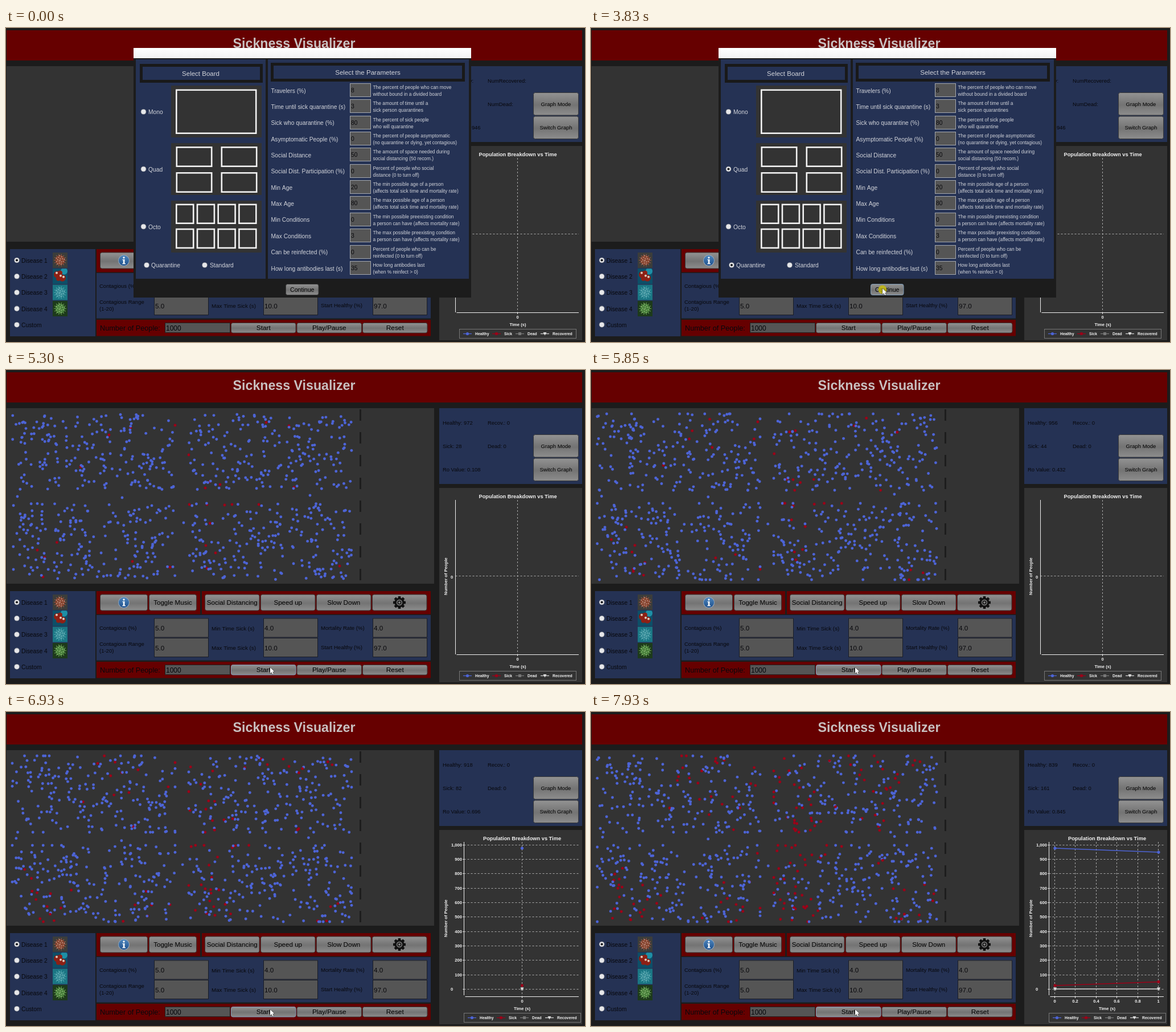
Recreate the animation shown at these times as an HTML page with a canvas. Size 1017 px wide and 551 px high, loop 8 s.

```html
<!DOCTYPE html>
<html lang="en">
<head>
<meta charset="utf-8">
<title>Sickness Visualizer</title>
<style>
html, body { margin: 0; width: 100%; height: 100%; overflow: hidden; background: #1c1c1c; }
canvas { display: block; }
</style>
</head>
<body>
<canvas id="stage" width="1017" height="551"></canvas>
<script>
const ctx = document.getElementById('stage').getContext('2d');
const LOOP = 8000, STEP = 77.2;
const DARK = '#1c1c1c', NAVY = '#253254', RED = '#660000', GREY = '#333333';
const INK = '#08080c', PALE = '#d2d4da', BLUE = '#4d64d6', SICK = '#9c0018';

// Drawing helpers
function box(x0, y0, x1, y1, color) {
  ctx.fillStyle = color;
  ctx.fillRect(x0, y0, x1 - x0, y1 - y0);
}
function frame(x0, y0, x1, y1, color, width = 1) {
  ctx.strokeStyle = color;
  ctx.lineWidth = width;
  ctx.strokeRect(x0 + width / 2, y0 + width / 2, x1 - x0 - width, y1 - y0 - width);
}
function disc(x, y, r, color) {
  ctx.fillStyle = color;
  ctx.beginPath();
  ctx.arc(x, y, r, 0, 7);
  ctx.fill();
}
function line(x0, y0, x1, y1, color, width = 1, dash = []) {
  ctx.strokeStyle = color;
  ctx.lineWidth = width;
  ctx.setLineDash(dash);
  ctx.beginPath();
  ctx.moveTo(x0, y0);
  ctx.lineTo(x1, y1);
  ctx.stroke();
  ctx.setLineDash([]);
}
function text(s, x, yMid, size, color = INK, align = 'left', weight = '') {
  ctx.font = `${weight} ${size}px "Liberation Sans", Arial, sans-serif`;
  ctx.textAlign = align;
  ctx.fillStyle = color;
  ctx.fillText(s, x, yMid + size * 0.36);
}
function button(x0, y0, x1, y1, label, size, focus) {
  const g = ctx.createLinearGradient(0, y0, 0, y1);
  g.addColorStop(0, '#949494');
  g.addColorStop(0.45, '#787878');
  g.addColorStop(0.55, '#747474');
  g.addColorStop(1, '#8e8e8e');
  ctx.beginPath();
  ctx.roundRect(x0 + 0.5, y0 + 0.5, x1 - x0 - 1, y1 - y0 - 1, 3);
  ctx.fillStyle = g;
  ctx.fill();
  ctx.strokeStyle = focus ? '#7c9ab8' : '#3a3a3a';
  ctx.lineWidth = 1;
  ctx.stroke();
  text(label, (x0 + x1) / 2, (y0 + y1) / 2, size, '#000', 'center');
}
function field(x0, y0, x1, y1, value, size, edge) {
  box(x0, y0, x1, y1, '#555555');
  frame(x0, y0, x1, y1, edge);
  text(value, x0 + 2, (y0 + y1) / 2 + 0.5, size);
}
function radio(x, y, label, tx, color, on, focus) {
  if (focus) disc(x, y, 5.8, '#7da3c8');
  disc(x, y, 4.8, '#8b8e94');
  disc(x, y, 4, '#e6e7ea');
  if (on) disc(x, y, 2.1, '#15171c');
  text(label, tx, y + 0.5, 10.3, color);
}

// Seeded population
function rng(seed) {
  return () => {
    seed = (seed + 0x6D2B79F5) | 0;
    let t = Math.imul(seed ^ (seed >>> 15), 1 | seed);
    t = (t + Math.imul(t ^ (t >>> 7), 61 | t)) ^ t;
    return ((t ^ (t >>> 14)) >>> 0) / 4294967296;
  };
}
const rand = rng(20);
const VISIBLE = 860;
const SEEDS = [[219, 101], [181, 114], [131, 170], [297, 97], [457, 92], [497, 98], [321, 149],
  [350, 207], [376, 201], [358, 196], [506, 206], [322, 236], [353, 236], [384, 237], [397, 236],
  [444, 236], [55, 316], [68, 329], [65, 363], [222, 336], [288, 346], [351, 308], [368, 321],
  [353, 348], [586, 344], [575, 363]];
const LONERS = [[20, 222], [204, 224], [312, 268], [534, 220]];

function person(x, y, loner) {
  return {
    x, y, loner,
    left: x < 309 ? 11 : 321, top: y < 222 ? 77 : 234,
    amp: 4 + rand() * 9, wx: 1.5 + rand() * 2.5, wy: 1.5 + rand() * 2.5,
    px: rand() * 6.3, py: rand() * 6.3
  };
}
const people = [...SEEDS.map(p => person(...p, false)), ...LONERS.map(p => person(...p, true))];
while (people.length < VISIBLE) {
  const q = people.length % 4;
  people.push(person((q % 2 ? 321 : 11) + rand() * 286, (q > 1 ? 234 : 77) + rand() * 134, false));
}
// Infection spreads to someone in reach of a random carrier
const order = people.slice(0, SEEDS.length);
const healthy = new Set(people.slice(SEEDS.length).filter(p => !p.loner));
while (order.length < 170) {
  const from = order[Math.floor(rand() * order.length)];
  const near = [...healthy].filter(p => Math.hypot(p.x - from.x, p.y - from.y) < 45);
  const next = near[Math.floor(rand() * near.length)];
  if (!next) continue;
  healthy.delete(next);
  order.push(next);
}
order.forEach((p, i) => { p.rank = i; });

const clamp = (v, a, b) => Math.min(b, Math.max(a, v));
function drawPerson(p, s, sick) {
  const amp = p.loner ? 1.5 : p.amp;
  let x = p.x + amp * (Math.sin(p.wx * s + p.px) - Math.sin(p.px));
  let y = p.y + amp * (Math.sin(p.wy * s + p.py) - Math.sin(p.py));
  if (!p.loner) {
    x = clamp(x, p.left, p.left + 286);
    y = clamp(y, p.top, p.top + 134);
  }
  disc(x, y, 2.45, p.rank < sick ? SICK : BLUE);
}

function track(keys, k, col) {
  let i = 0;
  while (i < keys.length - 2 && k > keys[i + 1][0]) i++;
  const a = keys[i], b = keys[i + 1];
  return a[col] + (b[col] - a[col]) * clamp((k - a[0]) / (b[0] - a[0]), 0, 1);
}
// step, sick, reproduction value
const STATS = [[64, 25, 0], [69, 28, 0.108], [76, 44, 0.432], [90, 82, 0.696], [103, 161, 0.845]];

// Chart
function marker(x, y, kind) {
  if (kind === 0) disc(x, y, 2.6, BLUE);
  else if (kind === 1) box(x - 2.3, y - 2.3, x + 2.3, y + 2.3, SICK);
  else if (kind === 2) box(x - 2.5, y - 2.5, x + 2.5, y + 2.5, '#777');
  else {
    ctx.fillStyle = '#ddd';
    ctx.beginPath();
    ctx.moveTo(x - 3, y - 2.5);
    ctx.lineTo(x + 3, y - 2.5);
    ctx.lineTo(x, y + 3);
    ctx.fill();
  }
}
// name, color, legend offset, first and second value heights
const SERIES = [['Healthy', BLUE, 0, 239, 246], ['Sick', SICK, 51, 480, 473.5],
  ['Dead', '#777', 92, 486, 486], ['Recovered', '#ccc', 136, 486, 486]];

function chart(points) {
  const shift = points ? 7.5 : 0, mid = 899 + shift, axis = points ? 804.5 : 789.5;
  const grid = '#a8a8a8', white = '#f0f0f0', dash = [3, 3];
  const label = (s, x, y, size = 7.6, align = 'center') => text(s, x, y, size, white, align, 'bold');
  box(761, 207, 1012, 548, GREY);
  label('Population Breakdown vs Time', mid, 222, 9.25);
  ctx.save();
  ctx.translate(772, 362);
  ctx.rotate(-Math.PI / 2);
  label('Number of People', 0, 0, 7.7);
  ctx.restore();
  if (points) {
    for (let i = 0; i <= 10; i++) {
      const y = Math.round(486 - i * 25.35) + 0.5;
      line(axis, y, 1006, y, grid, 1, dash);
      line(axis - 2, y, axis, y, white);
      if (i) label((i * 100).toLocaleString('en-US'), 801, y, 7.6, 'right');
      else label('0', 783, y);
    }
  } else {
    line(axis, 361.5, 1006, 361.5, grid, 1, dash);
    label('0', 783, 363);
  }
  const ticks = points === 2 ? 6 : 1;
  for (let i = 0; i < ticks; i++) {
    const x = ticks > 1 ? Math.round(815 + i * 36.45) - 0.5 : Math.floor(mid) - 0.5 + (points ? 1 : 0);
    line(x, 228, x, 499, grid, 1, dash);
    line(x, 499, x, 502, white);
    label(String(i / 5), x, 507.5);
  }
  line(axis, 228, axis, points ? 497 : 499, white);
  line(axis + 2, 499.5, 1006, 499.5, white);
  label('Time (s)', mid, 520);
  const lx = Math.round(796 + shift);
  frame(lx, 528, lx + 206, 545, '#777');
  SERIES.forEach(([name, color, dx, y0, y1], i) => {
    const x = lx + 7 + dx;
    line(x, 536.5, x + 15, 536.5, color, 1.3);
    marker(x + 7.5, 536.5, i);
    label(name, x + 21, 536.5, 6.8, 'left');
    if (points === 2) {
      line(815, y0, 997, y1, color, 1.4);
      marker(815, y0, i);
      marker(997, y1, i);
    } else if (points) marker(mid, y0, i);
  });
}

// Disease thumbnails
function spikyBall(x, y, [spike, ball, dot]) {
  for (let a = 0; a < 14; a++) {
    const c = Math.cos(a * 0.449), s = Math.sin(a * 0.449);
    line(x, y, x + 11 * c, y + 11 * s, spike, 1.4);
  }
  disc(x, y, 8.5, ball);
  for (let a = 0; a < 16; a++) {
    const r = 2.1 * Math.sqrt(a);
    disc(x + r * Math.cos(a * 2.4), y + r * Math.sin(a * 2.4), 0.9, dot);
  }
}
function thumb(i) {
  const x = 95, y = 407.5 + i * 28.3;
  ctx.save();
  ctx.beginPath();
  ctx.rect(82, y - 13.5, 26, 27);
  ctx.clip();
  box(82, y - 14, 108, y + 14, ['#3b3d3b', '#0d4f68', '#1b7684', '#1d3a1b'][i]);
  if (i === 1) {
    disc(102, y - 9, 6, '#1f8fa6');
    for (const [dx, dy, r] of [[-5, -3, 6], [0, -6, 4], [4, 3, 6], [-3, 4, 4]]) disc(x + dx, y + dy, r, '#8d2015');
    for (const [dx, dy] of [[-6, -6], [1, -1], [6, 1]]) disc(x + dx, y + dy, 2, '#dccabb');
  } else {
    spikyBall(x, y, [['#8a5240', '#87442f', '#c9a597'], 0, ['#4aa0aa', '#338a96', '#7fc0c6'],
      ['#5e9048', '#477f3a', '#9cc584']][i]);
  }
  ctx.restore();
}
function gear(x, y) {
  for (let a = 0; a < 8; a++) {
    const c = Math.cos(a * Math.PI / 4), s = Math.sin(a * Math.PI / 4);
    line(x, y, x + 11 * c, y + 11 * s, '#111', 4.6);
  }
  disc(x, y, 8.6, '#111');
  disc(x, y, 5.2, '#7c7c7c');
  disc(x, y, 3.6, '#111');
  disc(x, y, 2, '#7c7c7c');
}
function info(x, y) {
  const g = ctx.createLinearGradient(0, y - 9, 0, y + 9);
  g.addColorStop(0, '#4d86bd');
  g.addColorStop(1, '#1d4f8c');
  disc(x, y, 10, '#93a7bb');
  disc(x, y, 9, g);
  disc(x, y - 5, 1.7, '#f2f5f8');
  box(x - 2.5, y - 2, x + 1.5, y - 0.7, '#f2f5f8');
  box(x - 1.3, y - 2, x + 1.5, y + 6, '#f2f5f8');
  box(x - 2.7, y + 5, x + 3, y + 6.3, '#f2f5f8');
}

function mainWindow(k) {
  const run = k >= 64;
  const sick = run ? Math.round(track(STATS, k, 1)) : 0;
  box(0, 0, 1017, 551, DARK);
  box(1, 4, 1012, 57, RED);
  text('Sickness Visualizer', 506, 27, 23.2, '#c8c0c0', 'center', 'bold');
  box(1, 67, 752, 375, GREY);
  if (run) {
    for (let y = 69; y < 370; y += 40) box(621, y, 624, y + 20, '#1d1d1d');
    const s = (k - 69) * STEP / 1000;
    for (const p of people) drawPerson(p, s, sick);
  }

  box(761, 67, 1012, 200, NAVY);
  const ro = run ? track(STATS, k, 2).toFixed(3) : '0.946';
  text(run ? 'Healthy: ' + (1000 - sick) : 'NumHealthy:', 767, 93, 9.4);
  text(run ? 'Recov.: 0' : 'NumRecovered:', 846, 93, 9.4);
  text(run ? 'Sick: ' + sick : 'NumSick:', 767, 134, 9.4);
  text(run ? 'Dead: 0' : 'NumDead:', 846, 134, 9.4);
  text('Ro Value: ' + ro, 767, 175, 9.4);
  button(926, 113, 1006, 153.5, 'Graph Mode', 9.5);
  button(926, 154.5, 1006, 195, 'Switch Graph', 9.5);
  chart(k >= 93 ? 2 : k >= 80 ? 1 : 0);

  box(7, 388, 157, 541, NAVY);
  ['Disease 1', 'Disease 2', 'Disease 3', 'Disease 4', 'Custom'].forEach((name, i) => {
    radio(19, 407.5 + i * 28.3, name, 27, INK, i === 0);
    if (i < 4) thumb(i);
  });

  box(159, 388, 341, 428.5, RED);
  box(344, 388, 746, 428.5, RED);
  ['', 'Toggle Music'].forEach((s, i) => button(165 + i * 86, 393.5, 249 + i * 86, 422.5, s, 11.6));
  ['Social Distancing', 'Speed up', 'Slow Down', ''].forEach((s, i) =>
    button(349 + i * 98, 393.5, 445.5 + i * 98, 422.5, s, 11.6));
  info(207, 408);
  gear(691, 408);

  box(159, 430, 746, 509.5, NAVY);
  text('Contagious (%)', 164, 453, 9.5);
  text('Contagious Range', 164, 481, 9.5);
  text('(1-20)', 164, 493, 9.5);
  text('Min Time Sick (s)', 361, 453, 9.8);
  text('Max Time Sick (s)', 361, 487, 9.8);
  text('Mortality Rate (%)', 553, 453, 9.6);
  text('Start Healthy (%)', 553, 487, 9.6);
  [['5.0', '5.0'], ['4.0', '10.0'], ['4.0', '97.0']].forEach((col, i) => col.forEach((v, j) =>
    field(260 + i * 192, 435.5 + j * 34.5, 356 + i * 192, 469.5 + j * 34.5, v, 11.7, '#1a1d26')));

  box(159, 512, 746, 540.5, RED);
  text('Number of People:', 165, 526.5, 12.7);
  field(279, 517, 394, 535, '1000', 12, '#222');
  ['Start', 'Play/Pause', 'Reset'].forEach((s, i) =>
    button(395 + i * 115.5, 517, 509.5 + i * 115.5, 535.5, s, 11.8, i === 0 && k >= 60));
}

// Settings dialog
const PARAMS = `Travelers (%)|8|The percent of people who can move|without bound in a divided board
Time until sick quarantine (s)|3|The amount of time until a|sick person quarantines
Sick who quarantine (%)|80|The percent of sick people|who will quarantine
Asymptomatic People (%)|0|The percent of people asymptomatic|(no quarantine or dying, yet contagious)
Social Distance|50|The amount of space needed during|social distancing (50 recom.)
Social Dist. Participation (%)|0|Percent of people who social|distance (0 to turn off)
Min Age|20|The min possible age of a person|(affects total sick time and mortality rate)
Max Age|80|The max possible age of a person|(affects total sick time and mortality rate)
Min Conditions|0|The min possible preexisting condition|a person can have (affects mortality rate)
Max Conditions|3|The max possible preexisting condition|a person can have (affects mortality rate)
Can be reinfected (%)|0|Percent of people who can be|reinfected (0 to turn off)
How long antibodies last (s)|35|How long antibodies last|(when % reinfect > 0)`.split('\n').map(r => r.split('|'));

function dialog(k) {
  box(224, 35, 817, 473, DARK);
  const g = ctx.createLinearGradient(0, 35, 0, 53);
  g.addColorStop(0, '#fff');
  g.addColorStop(1, '#f2f2f2');
  box(224, 35, 817, 53, g);
  box(228, 55, 456, 440, NAVY);
  box(460, 55, 813, 440, NAVY);
  frame(235, 63, 451, 96, '#191919', 5);
  frame(465, 61, 806, 94, '#191919', 5);
  text('Select Board', 342, 79.5, 11.5, PALE, 'center');
  text('Select the Parameters', 635.5, 78, 11.6, PALE, 'center');

  for (const y of [101, 202, 303]) box(290, y, 449, y + 91, GREY);
  const white = '#f2f2f2';
  frame(298, 107.5, 440.5, 186, white, 2.6);
  for (let i = 0; i < 4; i++) {
    const x = 298.5 + (i % 2) * 79, y = 208 + (i >> 1) * 45;
    frame(x, y, x + 64, y + 36, white, 2.6);
  }
  for (let i = 0; i < 8; i++) {
    const x = 298 + (i % 4) * 36.7, y = 308.5 + (i >> 2) * 43.2;
    frame(x, y, x + 32.5, y + 35.5, white, 2.6);
  }
  radio(241.5, 147, 'Mono', 250, PALE);
  radio(241.5, 247.5, 'Quad', 250, PALE, k >= 16, k >= 16 && k < 35);
  radio(241.5, 348.5, 'Octo', 250, PALE);
  radio(247, 416, 'Quarantine', 255, PALE, k >= 36, k >= 35 && k < 49);
  radio(349, 416, 'Standard', 358, PALE);

  PARAMS.forEach(([label, value, a, b], i) => {
    const y = 110 + i * 28.35, top = Math.round(y - 13);
    text(label, 465.5, y, 10.25, PALE);
    field(604, top, 641, top + 24, value, 10.3, '#a4a8ae');
    text(a, 644.5, y - 6, 8.4, PALE);
    text(b, 644.5, y + 6, 8.4, PALE);
  });
  button(491, 449, 549.5, 469, 'Continue', 10.6, k >= 49);
}

// Pointer: start step, end step, then a quadratic curve
const MOVES = [[3, 12, 837, 508, 520, 350, 244, 247], [18, 30, 244, 247, 412, 425, 276, 427],
  [30, 33, 276, 427, 260, 418, 247, 414], [40, 48, 247, 414, 380, 450, 512, 457],
  [54, 59, 512, 457, 490, 490, 464, 522]];
const CLICKS = [[15, 17], [35, 36], [49, 52], [60, 64]];

function pointer(k) {
  if (k < 3) return;
  const [a, b, x0, y0, cx, cy, x1, y1] = MOVES.filter(m => k >= m[0]).pop();
  let u = clamp((k - a) / (b - a), 0, 1);
  u = u * u * (3 - 2 * u);
  const v = 1 - u;
  const x = v * v * x0 + 2 * u * v * cx + u * u * x1;
  const y = v * v * y0 + 2 * u * v * cy + u * u * y1;
  if (CLICKS.some(c => k >= c[0] && k < c[1])) disc(x, y + 2, 7.5, 'rgba(205,195,0,0.75)');
  ctx.save();
  ctx.translate(x, y);
  ctx.beginPath();
  ctx.moveTo(0, 0);
  for (const [px, py] of [[0, 10.5], [2.4, 8.3], [4.2, 12], [6, 11.2], [4.3, 7.6], [7.6, 7.4]]) ctx.lineTo(px, py);
  ctx.closePath();
  ctx.fillStyle = '#fff';
  ctx.strokeStyle = '#111';
  ctx.lineWidth = 1;
  ctx.stroke();
  ctx.fill();
  ctx.restore();
}

let last = -1;
const begin = performance.now();
function tick() {
  const t = (performance.now() - begin) % LOOP;
  const k = Math.min(103, Math.floor((t + 40) / STEP));
  if (k !== last) {
    last = k;
    mainWindow(k);
    if (k < 51) dialog(k);
    pointer(k);
  }
  requestAnimationFrame(tick);
}
tick();
</script>
</body>
</html>
```
